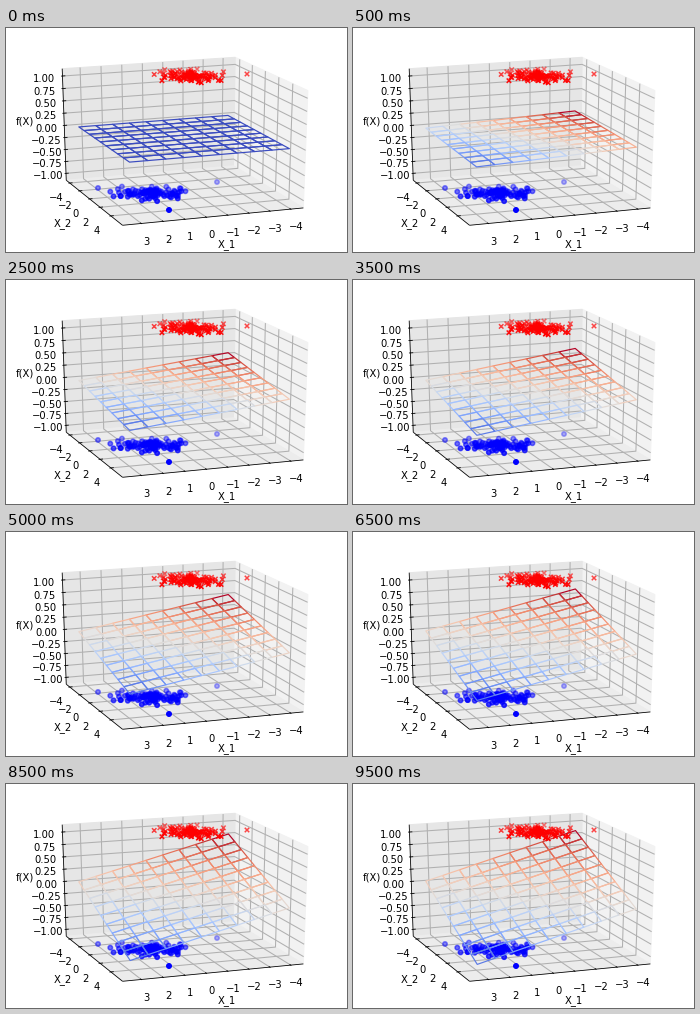
A matplotlib script that plays this animation: 341 px wide and 224 px high, repeating every 10 s.

```python
import numpy as np
import matplotlib.pyplot as plt
from matplotlib.animation import FuncAnimation
from matplotlib.collections import LineCollection, PolyCollection

WIDTH, HEIGHT, DPI = 341, 224, 100
PT = 72 / DPI                      # points per pixel
FRAMES, INTERVAL = 20, 500

LIMITS = np.array([(-4.44, 3.68), (-4.52, 5.87), (-1.1, 1.1)])
TICKS = [np.arange(-4, 4), np.arange(-4, 5, 2), np.linspace(-1, 1, 9)]
NAMES = ["X_1", "X_2", "f(X)"]
EDGE = 0.5 + 1 / 48                # panes reach slightly past the limits
TICK_GAP, NAME_GAP = 1 / 12, 0.18
AZIM, ELEV, DIST = np.radians(70), np.radians(20), 10
CENTER, SCALE = np.array([175.4, 109.5]), np.array([1806, -1168])

plt.rcParams["font.family"] = "DejaVu Sans"
plt.rcParams["font.size"] = 10 * PT


def unit(axis, value):
    low, high = LIMITS[axis]
    return (value - low) / (high - low) - 0.5


def project(points):
    """Perspective view of box coordinates (-0.5..0.5) in pixels."""
    a, b, c = np.moveaxis(np.asarray(points, float), -1, 0)
    right = -np.sin(AZIM) * a + np.cos(AZIM) * b
    toward = np.cos(AZIM) * a + np.sin(AZIM) * b
    up = np.cos(ELEV) * c - np.sin(ELEV) * toward
    depth = DIST - np.cos(ELEV) * toward - np.sin(ELEV) * c
    return CENTER + SCALE * np.stack([right / depth, up / depth], axis=-1)


fig = plt.figure(figsize=(WIDTH / DPI, HEIGHT / DPI), dpi=DPI, facecolor="white")
ax = fig.add_axes([0, 0, 1, 1])
ax.set_xlim(0, WIDTH)
ax.set_ylim(HEIGHT, 0)
ax.axis("off")


def add_lines(paths, color, width, zorder):
    ax.add_collection(LineCollection([project(p) for p in paths], colors=color,
                                     linewidths=width * PT, zorder=zorder))


def draw_pane(axis, shade):
    square = EDGE * np.array([(-1, -1), (1, -1), (1, 1), (-1, 1)])
    ax.add_patch(plt.Polygon(project(np.insert(square, axis, -EDGE, axis=1)),
                             facecolor=shade, edgecolor=shade, linewidth=PT, zorder=0))


def draw_axis(axis):
    """Grid, ticks and text; every axis starts on the (+, -) edge of the other two."""
    bend = EDGE * np.array([(1, -1), (-1, -1), (-1, 1)])
    tick = np.insert([1.0, 0.0], axis, 0)
    outward = np.insert([1.0, -1.0], axis, 0)

    grid = [np.insert(bend, axis, unit(axis, v), axis=1) for v in TICKS[axis]]
    add_lines(grid, "#b0b0b0", 1.05, 1)
    add_lines([[p[0] - tick / 60, p[0] + tick / 120] for p in grid], "black", 0.8, 2)
    add_lines([[np.insert(bend[0], axis, end) for end in (-EDGE, EDGE)]], "black", 0.8, 2)

    for value, path in zip(TICKS[axis], grid):
        text = f"{value:.2f}" if axis == 2 else f"{value}"
        ax.text(*project(path[0] + TICK_GAP * outward), text.replace("-", "\u2212"),
                ha="center", va="top")
    middle = np.insert(bend[0], axis, 0)
    ax.text(*project(middle + NAME_GAP * outward), NAMES[axis], ha="center", va="center")


def draw_cloud(center, spread, strays, fade, marker, color, zorder):
    """Static points in screen space; farther ones (higher up) fade out."""
    noise = np.clip(rng.normal(size=(100, 2)), -2.3, 2.3)
    points = np.vstack([center + noise * spread, strays])
    height = points[:, 1]
    alpha = 1 - fade * (height.max() - height) / np.ptp(height)
    ax.scatter(*points.T, s=20 * PT**2, color=color, alpha=alpha, marker=marker,
               linewidths=1.5 * PT, zorder=zorder)


for axis, shade in enumerate(["0.95", "0.90", "0.925"]):
    draw_pane(axis, shade)
for axis in range(3):
    draw_axis(axis)

rng = np.random.default_rng(7)
draw_cloud((148, 165.5), (19, 3.4), [(92, 160), (211, 154), (163, 182)],
           0.7, "o", "blue", 3)
draw_cloud((185, 48), (16, 3), [(241, 46)], 0.45, "x", "red", 5)

# The plane spans the data range, which leaves a 5 % margin to the limits.
spans = [np.linspace(-0.5, 0.5, 10) / 1.1 * (hi - lo) + (lo + hi) / 2
         for lo, hi in LIMITS[:2]]
X1, X2 = np.meshgrid(*spans)
mesh = PolyCollection([], facecolors="none", linewidths=1.2 * PT, zorder=4)
ax.add_collection(mesh)


def update(step):
    # The first weight is learned faster at the start than the second.
    progress = step / (FRAMES - 1)
    Z = -0.11 * progress**0.65 * X1 - 0.0986 * progress**0.9 * X2
    p = project(np.stack([unit(0, X1), unit(1, X2), unit(2, Z)], axis=-1))
    cells = np.stack([p[:-1, :-1], p[:-1, 1:], p[1:, 1:], p[1:, :-1]], axis=2)
    level = (Z - Z.min()) / (np.ptp(Z) or 1)
    mesh.set_verts(cells.reshape(-1, 4, 2))
    mesh.set_edgecolor(plt.cm.coolwarm(level[:-1, :-1].ravel()))
    return [mesh]


anim = FuncAnimation(fig, update, frames=FRAMES, interval=INTERVAL, repeat=True)
plt.show()
```
